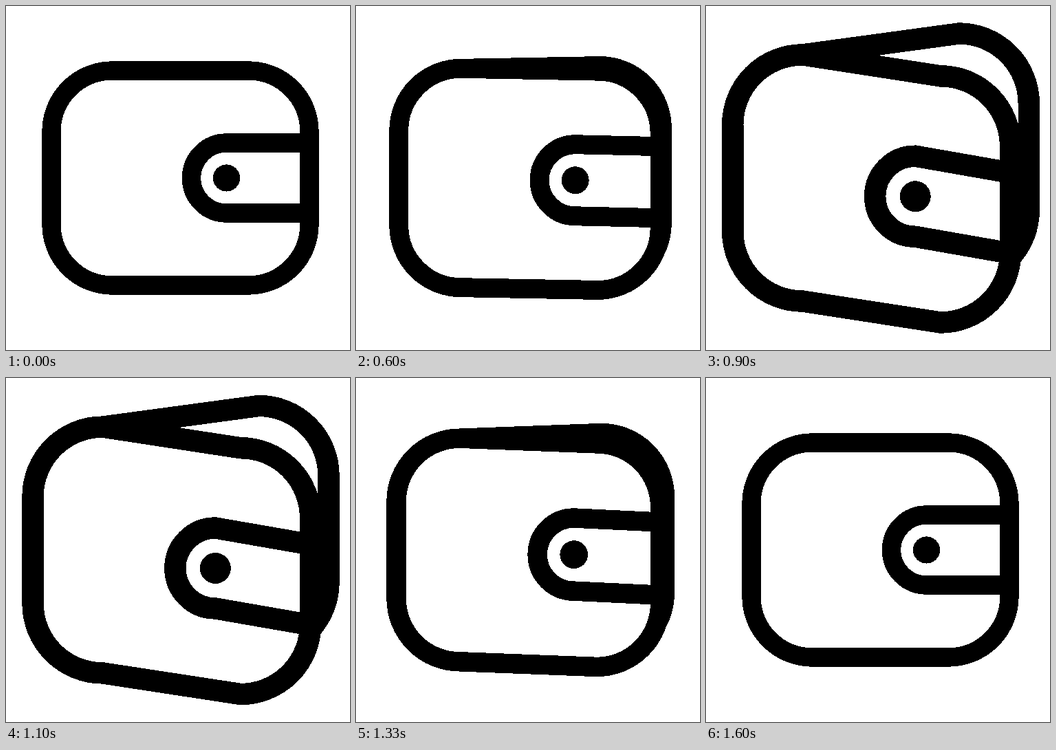
An HTML page that plays this animation: 500 by 500 pixels, repeating every 1.7 s.

```html
<!DOCTYPE html>
<html lang="en">
<head>
<meta charset="utf-8">
<title>Wallet</title>
<style>
  html, body { margin: 0; width: 100%; height: 100%; overflow: hidden; background: #fff; }
  svg { display: block; width: 100vw; height: 100vh; }
  path { fill: none; stroke: #000; stroke-width: 27.4; }
  #front { fill: #fff; }
  svg * { shape-rendering: crispEdges; }
</style>
</head>
<body>
<svg viewBox="0 0 500 500">
  <g id="wallet">
    <path id="back"/>
    <path id="front"/>
    <path id="strap"/>
    <circle id="button" r="19.6"/>
  </g>
</svg>
<script>
const LOOP = 1700, START = 376, HALF = 614, FRAME = 100 / 3;
const [wallet, back, front, strap, button] =
  ['wallet', 'back', 'front', 'strap', 'button'].map(id => document.getElementById(id));

const bezier = (t, a, b) => 3 * (1 - t) ** 2 * t * a + 3 * (1 - t) * t * t * b + t ** 3;

// cubic-bezier(.8, 0, .2, 1), solved by bisection
function ease(x) {
  if (x <= 0) return 0;
  if (x >= 1) return 1;
  let lo = 0, hi = 1;
  for (let i = 0; i < 30; i++) {
    const mid = (lo + hi) / 2;
    if (bezier(mid, .8, .2) < x) lo = mid; else hi = mid;
  }
  return bezier(lo, 0, 1);
}

// Rounded body whose right side is shifted by (dx, dy)
function cover(dx, dy) {
  const r = 88.5, left = 66, right = 441, top = 94, bottom = 406;
  const arc = (x, y) => `A${r} ${r} 0 0 1 ${x} ${y}`;
  return `M${left} ${top + r}${arc(left + r, top)}` +
    `L${right - r + dx} ${top + dy}${arc(right + dx, top + r + dy)}` +
    `V${bottom - r + dy}${arc(right - r + dx, bottom + dy)}` +
    `L${left + r} ${bottom}${arc(left, bottom - r)}Z`;
}

function draw(time) {
  const t = Math.floor((time % LOOP + 5) / FRAME) * FRAME - START;
  const open = ease(t / HALF) - ease(t / HALF - 1);
  const dx = -23.6 * open, dy = 27.3 * open, knob = 23.6 * open, end = 45 * open;

  wallet.setAttribute('transform',
    `translate(250 250) scale(${1 + .15 * open}) translate(-250 -250)`);
  back.setAttribute('d', cover(0, -dy));
  front.setAttribute('d', cover(dx, dy));
  strap.setAttribute('d',
    `M${441 + dx} ${199 + end}L${320.5 + dx} ${199 + knob}` +
    `a51 51 0 0 0 0 102L${441 + dx} ${301 + end}`);
  button.setAttribute('cx', 320.5 + dx);
  button.setAttribute('cy', 250 + knob);
}

function tick() {
  draw(performance.now());
  requestAnimationFrame(tick);
}
tick();
</script>
</body>
</html>
```
